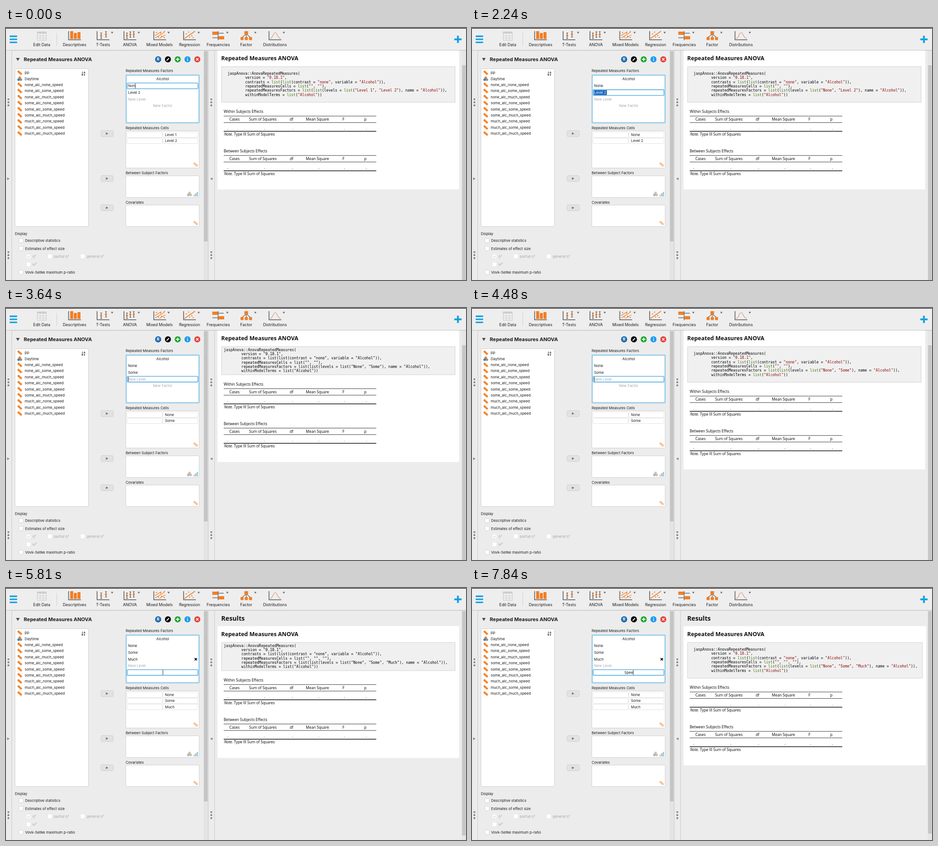
Recreate the animation shown at these times as an HTML page. Size 1010 px wide and 555 px high, loop 8000 ms.

```html
<!DOCTYPE html>
<html lang="en">
<head>
<meta charset="utf-8">
<title>Repeated Measures ANOVA</title>
<style>
html, body { margin: 0; width: 100%; height: 100%; overflow: hidden; background: #ececec; }
svg { display: block; width: 1010px; height: 555px; }
text { font: 7.9px Inter, sans-serif; fill: #1c1c1c; white-space: pre; }
.bar { font-size: 8.8px; }
.list { font-size: 8.05px; }
.head { font-size: 11px; font-weight: 700; }
.dim { fill: #a9a9a9; }
.mid { text-anchor: middle; }
.out { font: 8.25px "Open Sans", sans-serif; fill: #000; }
.h1 { font: 700 14.2px "Open Sans", sans-serif; fill: #111; }
.h2 { font: 700 12.4px "Open Sans", sans-serif; fill: #111; }
.code { font: 8px "DejaVu Sans Mono", monospace; fill: #000; }
.hl { fill: #444; }
.hl .str { fill: #880000; }
.hl .fn { fill: #397300; }
</style>
</head>
<body>
<svg viewBox="0 0 1010 555"><g id="base"></g><g id="live"></g></svg>
<script>
const LOOP = 8000, STEP = 70;
const ORANGE = '#f47d20', BLUE = '#14a1e0', GREY = '#6b6b6b';

const rect = (x, y, w, h, fill, stroke = 'none', r = 0, sw = 1) =>
  `<rect x="${x}" y="${y}" width="${w}" height="${h}" rx="${r}" fill="${fill}" stroke="${stroke}" stroke-width="${sw}"/>`;
const text = (x, y, s, cls = '', extra = '') => `<text x="${x}" y="${y}" class="${cls}" ${extra}>${s}</text>`;
const line = (d, stroke, sw = 1, extra = '') => `<path d="${d}" fill="none" stroke="${stroke}" stroke-width="${sw}" ${extra}/>`;
const fill = (d, color) => `<path d="${d}" fill="${color}"/>`;
const dot = (x, y, r, color) => `<circle cx="${x}" cy="${y}" r="${r}" fill="${color}"/>`;
const group = (s, attrs) => `<g ${attrs}>${s}</g>`;
const range = (n, f) => Array.from({ length: n }, (_, i) => f(i)).join('');

// Value of the last [time, value] entry that has begun
const at = (t, list) => list.filter(e => e[0] <= t).pop()[1];

const ruler = (x, y, opacity = 1) => group(
  rect(-5.5, -2.2, 11, 4.4, ORANGE, 'none', .6) + line('M-3 -2v1.6M-1 -2v2.2M1 -2v1.6M3 -2v2.2', '#fbd0a8', .6),
  `transform="translate(${x} ${y}) rotate(42)" opacity="${opacity}"`);
const nominal = (x, y, opacity = 1) => group(
  dot(0, -2.1, 2.9, ORANGE) + dot(-2.5, 2, 2.8, '#2b8bc9') + dot(2.5, 2, 2.8, '#948f89'),
  `transform="translate(${x} ${y})" opacity="${opacity}"`);
const grip = x => range(2, j => range(3, i => dot(x, 157 + j * 336.5 + i * 6.7, 2.1, '#858585')));

function toolbar() {
  const axes = x => line(`M${x} 7V25.8H${x + 27}`, GREY, 1.8);
  const caret = x => fill(`M${x - 2.6} 8.5h5.2l-2.6 4z`, GREY);
  const whisker = (x, y) => line(`M${x} ${y - 6}v12M${x - 2} ${y - 6}h4M${x - 2} ${y + 6}h4`, '#444', 1.1) + dot(x, y, 2.3, ORANGE);
  const labels = [[78.5, 'Edit Data'], [150.5, 'Descriptives'], [213, 'T-Tests'], [272, 'ANOVA'], [337, 'Mixed Models'],
    [403, 'Regression'], [466, 'Frequencies'], [527.5, 'Factor'], [590.5, 'Distributions']];
  const dots = (x, pts) => pts.map(p => dot(x + p[0], p[1], 1.3, ORANGE)).join('');
  return rect(0, 0, 1010, 49, '#eeeeee') + rect(0, 0, 1010, 1.2, '#15151a') + rect(0, 48.6, 1010, 1, '#b4b4b4')
    + range(3, i => rect(8, 16.6 + i * 6.7, 16.5, 3.3, BLUE, 'none', 1))
    + line('M992.3 17v16M984.3 25h16', BLUE, 4)
    + rect(68.5, 8.5, 20, 18.5, '#f5f5f5', '#c6c6c6') + rect(68.5, 8.5, 20, 4, '#cfcfcf')
    + line('M69 16.5h19.5M69 20h19.5M69 23.5h19.5M75 9v18M82 9v18', '#cacaca')
    + line('M111.5 11v28', '#cfcfcf')
    + axes(137.5) + rect(141, 7, 6.5, 17, ORANGE) + rect(149, 11, 6.5, 13, ORANGE) + rect(157, 9, 6.5, 15, ORANGE)
    + axes(200) + whisker(209, 17) + whisker(219.5, 14)
    + axes(259) + whisker(265.5, 17) + whisker(273, 14.5) + whisker(280.5, 14)
    + axes(324.5) + line('M327 17l14 -9M328 22l20 -13M337 23l13 -8', ORANGE, 1.3)
    + dots(324.5, [[6, 10], [10, 20], [15, 11], [17, 18], [23, 8], [23, 21]])
    + axes(390) + line('M392 23L415 7', ORANGE, 1.6) + dots(390, [[6, 13], [11, 9], [13, 20], [18, 17], [21, 21]])
    + rect(453, 8, 12, 7, ORANGE) + rect(466.5, 18, 12.5, 7, ORANGE)
    + line('M465.7 7v20', GREY, 1.5) + line('M466 11.5h12M453 21.5h12', GREY, 1.4)
    + line('M527.5 13L518 21M527.5 13v8M527.5 13L537 21', GREY, 1.3)
    + rect(523.5, 7, 8, 7, ORANGE) + range(3, i => rect(515 + i * 9.3, 20, 6.6, 6.6, ORANGE))
    + axes(577.5) + line('M580 23C587 22 586 10 591 10S595 22 603 23', '#e2947c', 1.2)
    + [233, 291.5, 357, 423, 486, 547.5, 610].map(caret).join('')
    + labels.map(([x, s]) => text(x, 39.8, s, 'bar mid')).join('');
}

function headerButtons() {
  const y = 69;
  return dot(334, y, 6.7, '#1565ad') + text(334, 72.3, 'R', 'mid', 'style="font-weight:700;font-size:9px;fill:#fff"')
    + dot(355.5, y, 6.7, '#0b0b0b') + line('M353 71.5l5 -5', '#fff', 1.9) + line('M352.2 72.4l1 -1', '#fff', 1)
    + dot(377, y, 6.7, '#17a92f') + line('M377 65.2v7.6M373.2 69h7.6', '#fff', 2)
    + dot(398.5, y, 6.7, '#1a9cf0') + dot(398.5, 66, 1, '#fff') + line('M398.5 68v4.6', '#fff', 1.6)
    + dot(420, y, 6.7, '#e5453d') + line('M417.5 66.5l5 5m0 -5l-5 5', '#fff', 1.6);
}

function form() {
  const box = (x, y, w, h) => rect(x, y, w, h, '#fff', '#cbcbcb', 2, .9);
  const check = (x, y, dim) => rect(x, y - 4.8, 9.6, 9.6, '#fff', dim ? '#e4e4e4' : '#c9c9c9', 2, .8);
  const amounts = ['none', 'some', 'much'];
  const vars = ['pp', 'Daytime', ...amounts.flatMap(a => amounts.map(s => `${a}_alc_${s}_speed`))];
  const add = y => rect(208.7, y - 6.5, 26.6, 13, '#e3e3e3', '#c6c6c6', 2, .8) + fill(`M219.3 ${y - 2.8}v5.6l5.4 -2.8z`, '#777');
  return rect(0, 49.6, 12.5, 506, '#ebebeb') + line('M12.7 50v505', '#c4c4c4', .9) + grip(5.3) + fill('M2.6 329v6l5 -3z', '#858585')
    + rect(434, 50, 9.6, 505, '#e4e4e4') + rect(434.6, 51, 8, 419, '#c4c4c4')
    + rect(444, 50, 14, 505, '#ececec') + line('M444 50v505M458 50v505', '#c4c4c4', .9) + grip(450.8) + fill('M453.4 329v6l-5 -3z', '#858585')
    + fill('M22 66h8l-4 6.6z', '#4a4a4a') + text(39, 73, 'Repeated Measures ANOVA', 'head') + headerButtons()
    + box(19.8, 89.7, 161.2, 347.5)
    + vars.map((v, i) => {
      const y = 98.4 + i * 13.4;
      return (i == 1 ? nominal : ruler)(30.2, y) + text(41, y + 2.8, v, 'list');
    }).join('')
    + line('M167.6 96v8.4M165.8 102.4l1.8 2.2l1.8 -2.2', '#222', 1)
    + ['A', 'Z'].map((c, i) => text(172.2, 99.8 + i * 5, c, 'mid', 'style="font-size:5.2px;font-weight:700"')).join('')
    + [232.5, 331.6, 396].map(add).join('')
    + [['Repeated Measures Factors', 97], ['Repeated Measures Cells', 222.8], ['Between Subject Factors', 322], ['Covariates', 386.5]]
      .map(([s, y]) => text(262.7, y, s)).join('')
    + box(263, 226.4, 161.2, 82) + ruler(416.5, 300.6, .5)
    + box(263, 325.5, 161.2, 47.7) + nominal(403, 365.6, .55)
    + group(rect(411.8, 366.5, 2.8, 4.5, ORANGE) + rect(415.3, 364, 2.8, 7, '#2b8bc9') + rect(418.8, 361, 2.8, 10, '#2b8bc9'), 'opacity=".5"')
    + box(263, 390, 161.2, 47.2) + ruler(416.5, 429.5, .5)
    + text(19.5, 455.6, 'Display')
    + [['Descriptive statistics', 468], ['Estimates of effect size', 485.6], ['Vovk-Sellke maximum p-ratio', 538]]
      .map(([s, y]) => check(28.3, y) + text(42, y + 2.9, s)).join('')
    + [['η²', 44.6, 503], ['partial η²', 91.7, 503], ['general η²', 163.7, 503], ['ω²', 44.6, 520.5]]
      .map(([s, x, y]) => check(x, y, true) + text(x + 13.4, y + 2.9, s, 'dim')).join('')
    + line('M47 503.2l1.8 1.9l3.2 -4', '#cfcfcf', 1.1);
}

const pen = document.createElement('canvas').getContext('2d');
function textWidth(s) {
  pen.font = '7.9px Inter, sans-serif';
  return pen.measureText(s).width;
}

function factors(t, levels) {
  const [row, since] = at(t, [[0, [0, -999]], [1120, [1, 1120]], [3360, [2, 3360]], [5600, [4, 5600]]]);
  const typed = at(t, [[0, 'Non'], [70, 'None'], [1120, 'Level 2'], [2590, 'S'], [2800, 'So'], [2870, 'Som'], [3010, 'Some'],
    [3360, ''], [4760, 'M'], [4970, 'Mu'], [5040, 'Muc'], [5180, 'Much'], [5600, ''], [7420, 'S'], [7700, 'Spe'], [7840, 'Spee']]);
  const caret = at(t, [[0, 1], [630, 0], [1120, 1], [1680, 0], [2240, 1], [3920, 0], [4480, 1], [6090, 0], [6650, 1], [7140, 0], [7490, 1]]);
  const selected = t >= 1120 && t < 2590;
  const grow = Math.min(1, (t - since) / 210);
  const rowY = i => 127.4 + i * 14.65;
  const y = rowY(row), width = textWidth(typed);
  const left = row == 4 ? 344 - width / 2 : 268;
  let s = rect(263.8, 103.8, 160, 105, '#fff', '#7fc4e6', 1, 2) + text(344, 115.4, 'Alcohol', 'mid')
    + rect(266, y - 6.2, 155.4, 12.6, '#fff', grow < .5 ? '#93cbe9' : '#58afe0', 2, .9 + .7 * grow);
  if (selected) s += rect(267.5, y - 5, width + .8, 10.6, '#1764c0');
  [...levels, 'New Level', 'New Factor'].forEach((name, i) => {
    const editing = i == row, isFactor = i > levels.length;
    const hint = i >= levels.length && !(editing && typed);
    const label = editing && (typed || isFactor) ? typed : name;
    s += text(isFactor ? 344 : 268, rowY(i) + 2.8, label, (hint ? 'dim ' : '') + (isFactor ? 'mid' : ''),
      editing && selected ? 'style="fill:#fff"' : '');
  });
  if (caret) s += rect(left + width + .1, y - 5.2, .9, 10.6, '#111');
  if (levels.length > 2) s += line('M414.2 154.3l5 5m0 -5l-5 5', '#000', 1.8);
  return s + levels.map((name, i) => {
    const cy = 229 + i * 13.4;
    return rect(265.3, cy, 77.8, 12.2, '#fff', '#dadada', 2, .8) + rect(344.3, cy, 77, 12.2, '#fff', '#dadada', 2, .8)
      + text(349, cy + 8.9, name);
  }).join('');
}

function table(title, y) {
  const cols = [['Cases', 501.7, 487], ['Sum of Squares', 564, 568], ['df', 627, 629], ['Mean Square', 683.8, 687], ['F', 741, 743], ['p', 789, 791]];
  return text(478, y, title, 'out')
    + line(`M478 ${y + 6.7}h335M478 ${y + 21}h335`, '#222', .9) + line(`M478 ${y + 40.3}h335`, '#111', 1.5)
    + cols.map(([s, x, d]) => text(x, y + 16.8, s, 'out mid') + text(d, y + 36.3, '.', 'out mid')).join('')
    + text(479, y + 49.6, '<tspan font-style="italic">Note.</tspan> Type III Sum of Squares', 'out');
}

function results(t, levels) {
  const top = t >= 5740;
  const start = at(t, [[0, -999], [1120, 1120], [3360, 3360], [5600, 5600]]);
  const { lead, spin, plain } = { 1120: { lead: 152, spin: 280, plain: 420 }, 3360: { lead: 64, spin: 280, plain: 490 },
    5600: { lead: 140, spin: 210, plain: 280 } }[start] || { lead: 999, spin: 0, plain: 0 };
  const age = t - start;
  const tight = age < plain, pad = tight ? 0 : 8.3;
  const fade = .5 - Math.cos(Math.PI * Math.min(1, (age + lead) / 350)) / 2;
  const shift = top ? 35 : 0, wide = t >= 5950 ? 3 : 0;
  const drop = shift - (tight ? 16.3 : 0);
  const pageTop = top ? 84 : 49.6;
  const quoted = levels.map(s => `"${s}"`).join(', '), blanks = levels.map(() => '""').join(', ');
  const code = ['jaspAnova::AnovaRepeatedMeasures(',
    'version = "0.18.1",',
    'contrasts = list(list(contrast = "none", variable = "Alcohol")),',
    `repeatedMeasuresCells = list(${blanks}),`,
    `repeatedMeasuresFactors = list(list(levels = list(${quoted}), name = "Alcohol")),`,
    'withinModelTerms = list("Alcohol"))'];
  const paint = s => s.replace(/"[^"]*"|\blist\b/g, m => `<tspan class="${m[0] == '"' ? 'str' : 'fn'}">${m}</tspan>`);
  const block = rect(473.3, 85 + shift, 512.7 + wide, 62 + 2 * pad, '#f0f0f0', '#cccccc', 0, .9)
    + code.map((s, i) => text(478.3 + pad, 94.5 + shift + pad + i * 9.35, (i ? ' '.repeat(8) : '') + paint(s), 'code')).join('');
  let s = rect(464.5, pageTop, 530.5 + wide * .7, 355.5 + drop - pageTop, '#fff')
    + (top ? text(472.5, 72, 'Results', 'h1') : '')
    + text(472.5, 71.3 + shift, 'Repeated Measures ANOVA', 'h2')
    + group(block, `opacity="${fade}" class="${tight ? '' : 'hl'}"`)
    + table('Within Subjects Effects', 187.3 + drop) + table('Between Subjects Effects', 274.1 + drop);
  if (age < spin)
    s += line('M661.2 65.4A4.1 4.1 0 1 0 666 63', '#555', 1.3, `transform="rotate(${age * .5} 665 67)"`);
  const thumb = !top ? [82, 473] : tight ? [51, 494] : [51, 490];
  return s + rect(1000.5, 50, 9.5, 505, '#e6e6e6') + rect(1001.3, thumb[0], 8, thumb[1], '#c6c6c6');
}

base.innerHTML = rect(0, 0, 1010, 555, '#ececec') + toolbar() + form();

const begin = performance.now();
let shown = -1;
function draw() {
  const t = Math.floor((performance.now() - begin) % LOOP / STEP) * STEP;
  if (t != shown) {
    shown = t;
    const levels = at(t, [[0, ['Level 1', 'Level 2']], [1120, ['None', 'Level 2']], [3360, ['None', 'Some']], [5600, ['None', 'Some', 'Much']]]);
    live.innerHTML = factors(t, levels) + results(t, levels);
  }
  requestAnimationFrame(draw);
}
draw();
</script>
</body>
</html>
```
